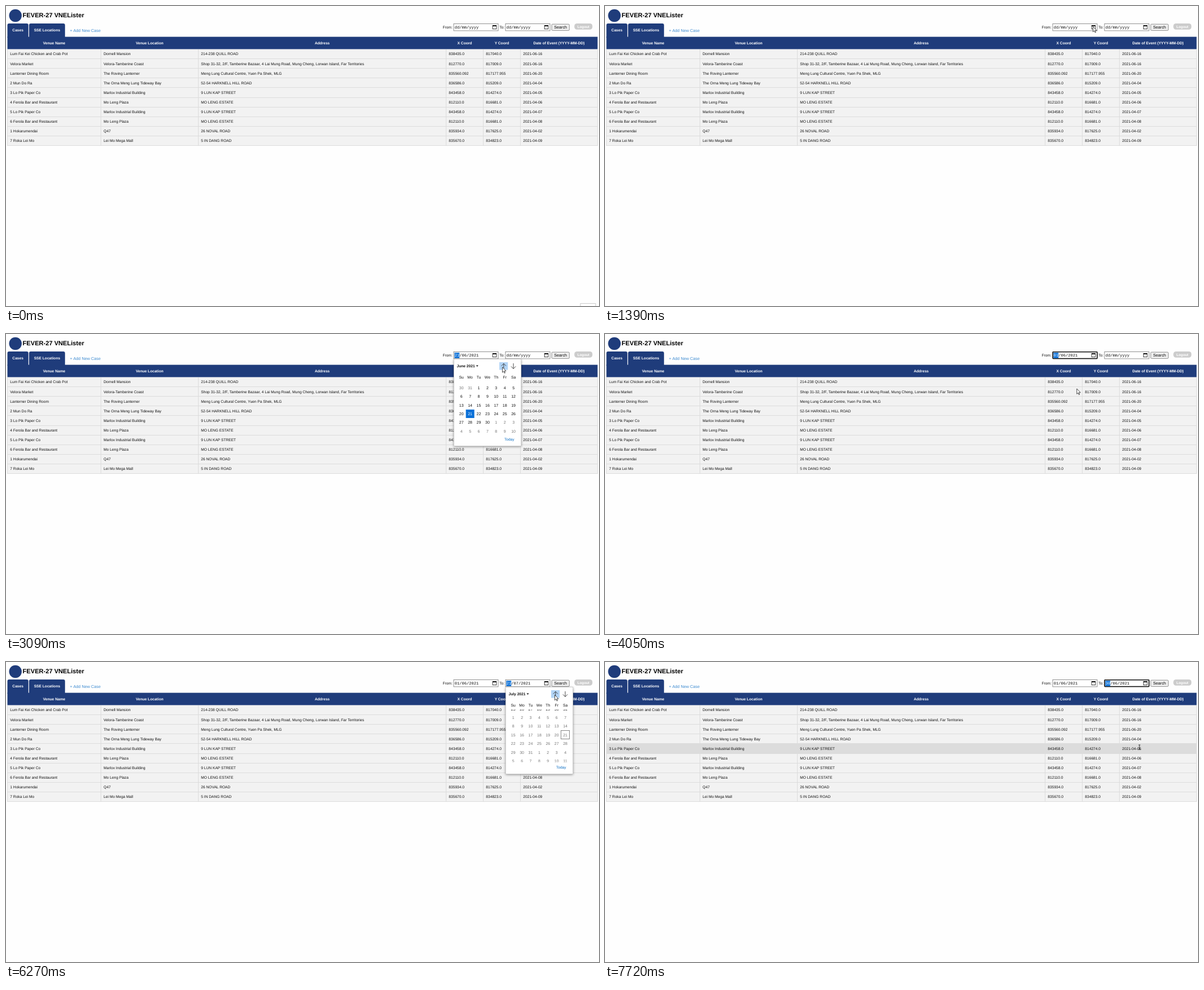
An HTML page for the animation above (7990 ms loop, 1053 by 532 pixels).

```html
<!DOCTYPE html>
<html lang="en">
<head>
<meta charset="utf-8">
<title>Event locations</title>
<style>
  html, body { margin: 0; width: 100%; height: 100%; overflow: hidden; background: #fefefe; }
  svg { display: block; width: 100vw; height: 100vh; }
  text {
    font-family: "Liberation Sans", Arial, sans-serif;
    text-rendering: geometricPrecision;
    white-space: pre;
  }
  .mono { font-family: "Liberation Mono", "Courier New", monospace; }
  .crisp { shape-rendering: crispEdges; }
</style>
</head>
<body>
<svg id="stage" viewBox="0 0 1053 532" preserveAspectRatio="none"></svg>
<script>
const LOOP = 7990;
const NAVY = '#1f3c7b', BLUE = '#0a70d8', HOVER = '#b3d5f7';
const stage = document.getElementById('stage');

function add(parent, tag, attrs = {}) {
  const el = document.createElementNS('http://www.w3.org/2000/svg', tag);
  for (const k in attrs) el.setAttribute(k, attrs[k]);
  parent.append(el);
  return el;
}
const rect = (p, x, y, width, height, attrs) => add(p, 'rect', { x, y, width, height, ...attrs });
const path = (p, d, attrs) => add(p, 'path', { d, fill: 'none', ...attrs });
function text(p, str, x, y, size = 6.65, attrs = {}) {
  const el = add(p, 'text', { x, y, 'font-size': size, fill: '#111', ...attrs });
  el.textContent = str;
  return el;
}
const MID = { 'text-anchor': 'middle' };
const BOLD = { 'font-weight': 700 };
const CRISP = { class: 'crisp' };
const show = (el, on) => el.setAttribute('visibility', on ? 'visible' : 'hidden');
const within = (t, [a, b]) => t >= a && t < b;

// Page header
add(stage, 'circle', { cx: 16.7, cy: 17, r: 11.2, fill: NAVY });
text(stage, 'FEVER-27 VNELister', 29.6, 20.3, 11.1, { ...BOLD, fill: '#000' });
function tab(label, x, w) {
  path(stage, `M${x} 56V34q0-3 3-3h${w - 6}q3 0 3 3v22z`, { fill: NAVY });
  text(stage, label, x + w / 2, 44.9, 6.65, { ...MID, ...BOLD, fill: '#fff' });
}
tab('Cases', 2.5, 37.3);
tab('SSE Locations', 41, 63.8);
text(stage, '+ Add New Case', 113.5, 45.7, 7.3, { fill: '#3c8ad0' });
text(stage, 'From:', 775.4, 40.1);
text(stage, 'To:', 876.3, 40.1);
rect(stage, 969, 32.2, 31.3, 11.2, { rx: 1.5, fill: '#efefef', stroke: '#767676', 'stroke-width': .8 });
text(stage, 'Search', 984.7, 40.2, 7.2, { ...MID, fill: '#000' });
rect(stage, 1009.3, 31, 32, 10.8, { rx: 4.5, fill: '#ccc' });
text(stage, 'Logout', 1025.3, 38.5, 6.3, { ...MID, ...BOLD, fill: '#fff' });

// Table
const EDGES = [2.5, 168.5, 341.5, 781.5, 847.5, 913.5, 1050.5];
const TOP = 76.5, ROW = 17.1;
const HEADS = ['Venue Name', 'Venue Location', 'Address', 'X Coord', 'Y Coord', 'Date of Event (YYYY-MM-DD)'];
const ROWS = `Lum Fai Kei Chicken and Crab Pot|Dornell Mansion|214-238 QUILL ROAD|838435.0|817040.0|2021-06-16
Velora Market|Velora-Tamberine Coast|Shop 31-32, 2/F, Tamberine Bazaar, 4 Lai Mung Road, Mung Cheng, Lorwan Island, Far Territories|812770.0|817009.0|2021-06-16
Lanterner Dining Room|The Roving Lanterner|Meng Lung Cultural Centre, Yuen Pa Shek, MLG|835560.092|817177.955|2021-06-20
2 Mun Do Ra|The Orna Meng Lung Tideway Bay|52-54 HARKNELL HILL ROAD|836586.0|815209.0|2021-04-04
3 Lo Pik Paper Co|Marlox Industrial Building|9 LUN KAP STREET|843458.0|814274.0|2021-04-05
4 Ferola Bar and Restaurant|Mo Leng Plaza|MO LENG ESTATE|812110.0|816681.0|2021-04-06
5 Lo Pik Paper Co|Marlox Industrial Building|9 LUN KAP STREET|843458.0|814274.0|2021-04-07
6 Ferola Bar and Restaurant|Mo Leng Plaza|MO LENG ESTATE|812110.0|816681.0|2021-04-08
1 Hokarumendai|Q47|26 NOVAL ROAD|835934.0|817625.0|2021-04-02
7 Roka Lei Mo|Lei Mo Mega Mall|5 IN DANG ROAD|835670.0|834823.0|2021-04-09`
  .split('\n').map(line => line.split('|'));

const tableWidth = EDGES[6] - EDGES[0];
const bands = ROWS.map((cells, i) => rect(stage, EDGES[0], TOP + i * ROW, tableWidth, ROW, CRISP));
const bottom = TOP + ROWS.length * ROW;
const grid = { ...CRISP, stroke: '#dcdcdc', 'stroke-width': 1 };
ROWS.forEach((cells, i) => {
  path(stage, `M${EDGES[0]} ${Math.floor(TOP + (i + 1) * ROW) + .5}H${EDGES[6]}`, grid);
  cells.forEach((s, c) => text(stage, s, EDGES[c] + 4.8, TOP + i * ROW + 10.9));
});
EDGES.forEach(x => path(stage, `M${x} ${TOP}V${bottom}`, grid));
rect(stage, EDGES[0], 54.6, tableWidth, TOP - 54.6, { fill: NAVY });
HEADS.forEach((s, c) => text(stage, s, (EDGES[c] + EDGES[c + 1]) / 2, 67.8, 6.65, { ...MID, ...BOLD, fill: '#fff' }));

const corner = rect(stage, 1020, 527.6, 27, 8, { fill: '#fff', stroke: '#c4c4c4', 'stroke-width': .9 });

// Date fields: values by time, focus span, ring span, popup span
const GAP = 92;
const SCROLL = 284;
const BLANK = 'dd/mm/yyyy';
const FIELDS = [
  { dx: 0, focus: [1460, 5450], ring: [3780, 5450], open: [1460, 3780], clicks: [2380, 2665],
    values: [[0, BLANK], [2380, '21/07/2021'], [2665, '21/06/2021'], [3780, '01/06/2021']] },
  { dx: GAP, focus: [5520, LOOP], ring: [7110, LOOP], open: [5520, 7110], clicks: [6230, 6515],
    values: [[0, BLANK], [6230, '21/07/2021'], [6515, '21/06/2021'], [7110, '30/06/2021']] },
];
const valueAt = (f, t) => f.values.filter(v => v[0] <= t).pop()[1];

for (const f of FIELDS) {
  const g = add(stage, 'g', { transform: `translate(${f.dx} 0)` });
  rect(g, 795, 31.5, 79, 12.4, { fill: '#fff', stroke: '#767676', 'stroke-width': .8 });
  f.ringEl = rect(g, 795.2, 31.8, 78.8, 11.8, { rx: 1, fill: 'none', stroke: '#101010', 'stroke-width': 1.5 });
  f.mark = rect(g, 796.4, 33.2, 8.8, 9.6, { fill: BLUE });
  f.day = text(g, '', 796.7, 40.3, 7.1, { class: 'mono' });
  f.rest = text(g, '', 805.2, 40.3, 7.1, { class: 'mono' });
  rect(g, 864.2, 34.4, 6.6, 6.4, { fill: 'none', stroke: '#111', 'stroke-width': .8 });
  rect(g, 864, 34, 7, 2, { fill: '#111' });
}

// Calendar popup
const CELL = 15.4, COL0 = 808.7, WEEK0 = 95.3;
const MONTHS = { 6: 'June 2021', 7: 'July 2021', 8: 'August 2021' };
const defs = add(stage, 'defs');
rect(add(defs, 'clipPath', { id: 'weeks' }), 796, 84.3, 118, 93.2);
const popup = add(stage, 'g');
rect(popup, 795.3, 44.6, 119.4, 154, { fill: '#fff', style: 'filter: drop-shadow(0 1.5px 2px #0007)' });
rect(popup, 795.3, 44.6, 119.4, 154, { fill: '#fff', stroke: '#c2c2c2', 'stroke-width': .7 });
const title = text(popup, '', 800.5, 59.1, 6.65, BOLD);
const caret = path(popup, 'M0 55.6h4l-2 2.4z', { fill: '#111' });
const upHover = rect(popup, 876, 50, 15.2, 13.6, { fill: HOVER });
const line = { stroke: '#333', 'stroke-width': .9 };
path(popup, 'M883.8 62V52.4M879.7 56.6l4.1-4.2l4.1 4.2', line);
path(popup, 'M901 52V61.6M896.9 57.4l4.1 4.2l4.1-4.2', line);
['Su', 'Mo', 'Tu', 'We', 'Th', 'Fr', 'Sa'].forEach((s, d) => text(popup, s, COL0 + d * CELL, 79.4, 6.8, MID));
text(popup, 'Today', 893.8, 189.4, 6.5, { ...MID, fill: '#0067c0' });

const weeks = add(add(popup, 'g', { 'clip-path': 'url(#weeks)' }), 'g');
const square = attrs => rect(weeks, -7.5, -7.5, 15, 15, attrs);
const dayHover = square({ fill: HOVER });
const picked = square({ fill: BLUE });
const today = square({ ...CRISP, fill: 'none', stroke: '#858585', 'stroke-width': 1 });
const moveTo = (el, week, d) => el.setAttribute('transform', `translate(${COL0 + d * CELL} ${WEEK0 + week * CELL})`);
moveTo(today, 2, 6);
const days = [];
for (let week = -10; week < 7; week++) {
  for (let d = 0; d < 7; d++) {
    const date = new Date(Date.UTC(2021, 7, 1 + week * 7 + d));
    const el = text(weeks, date.getUTCDate(), COL0 + d * CELL, WEEK0 + week * CELL + 2.5, 7, MID);
    days.push({ el, week, d, month: date.getUTCMonth() + 1, day: date.getUTCDate() });
  }
}

// Pointer
const glow = add(stage, 'circle', { cy: 1.8, r: 6.8, fill: '#e8e200', 'fill-opacity': .65 });
const arrow = path(stage, 'M0 0V9.4L2.2 7.4L3.7 10.7L5 10.1L3.6 6.9H6.5Z',
  { fill: '#fff', stroke: '#111', 'stroke-width': .75 });
const beam = path(stage, 'M-1.6-4H1.6M0-4V4M-1.6 4H1.6', { stroke: '#111', 'stroke-width': .8 });
const TRAIL = [
  [400, 975, 508], [1180, 870, 47], [1320, 866.6, 36.5], [1920, 866.6, 36.5],
  [2250, 885.4, 55.2], [3000, 885.4, 55.2], [3510, 838.6, 97], [4050, 837.8, 97],
  [4430, 850, 116], [4610, 876, 76], [5310, 958.6, 37], [5600, 958.6, 37],
  [6060, 974.5, 58.4], [6580, 974.5, 58.4], [6970, 947.5, 157], [7200, 947.5, 157],
  [7650, 949, 151],
];
const GLOWS = [1430, 2440, 2690, 3730, 5440, 6300, 6550, 7060];

const smooth = p => p * p * (3 - 2 * p);
const inOut = p => p < .5 ? 2 * p * p : 1 - 2 * (1 - p) ** 2;
const clamp = p => Math.min(1, Math.max(0, p));

function pointerAt(t) {
  const i = TRAIL.findIndex(k => k[0] > t);
  if (i < 0) return TRAIL[TRAIL.length - 1].slice(1);
  if (i === 0) return TRAIL[0].slice(1);
  const [t0, x0, y0] = TRAIL[i - 1], [t1, x1, y1] = TRAIL[i];
  const p = smooth((t - t0) / (t1 - t0));
  return [x0 + (x1 - x0) * p, y0 + (y1 - y0) * p];
}

function drawField(f, t) {
  const value = valueAt(f, t), focused = within(t, f.focus);
  f.day.textContent = value.slice(0, 2);
  f.rest.textContent = value.slice(2);
  f.day.setAttribute('fill', focused ? '#fff' : '#111');
  show(f.mark, focused);
  show(f.ringEl, within(t, f.ring));
}

function drawPopup(f, t, x, y) {
  const value = valueAt(f, t);
  const chosen = value !== BLANK;
  const day = chosen ? +value.slice(0, 2) : 0;
  const month = chosen ? +value.slice(3, 5) : 8;
  const part = f.clicks.map(c => inOut(clamp((t - c) / SCROLL)));
  const offset = 5 * part[0] + 4 * part[1];
  const px = x - f.dx;

  popup.setAttribute('transform', `translate(${f.dx} 0)`);
  weeks.setAttribute('transform', `translate(0 ${offset * CELL})`);
  title.textContent = MONTHS[month];
  caret.setAttribute('transform', `translate(${802.6 + title.getComputedTextLength()} 0)`);
  show(upHover, px > 876 && px < 891.2 && y > 50 && y < 63.6);

  const col = Math.round((px - COL0) / CELL), row = Math.round((y - WEEK0) / CELL);
  show(dayHover, y > 87.6 && row < 6);
  moveTo(dayHover, row - Math.round(offset), col);
  show(picked, chosen);
  for (const c of days) {
    const isPicked = c.day === day && c.month === month;
    if (isPicked) moveTo(picked, c.week, c.d);
    c.el.setAttribute('fill', isPicked ? '#fff' : c.month === month ? '#111' : '#767676');
  }
}

function render(t) {
  const [x, y] = pointerAt(t);
  show(corner, t < 70);
  FIELDS.forEach(f => drawField(f, t));

  const active = FIELDS.find(f => within(t, f.open));
  popup.setAttribute('display', active ? 'inline' : 'none');
  if (active) drawPopup(active, t, x, y);

  const idle = t < 400 || active || within(t, [3780, 4120]) || within(t, [7110, 7250]);
  const over = idle ? -1 : Math.floor((y - TOP + 1) / ROW);
  bands.forEach((b, i) => b.setAttribute('fill', i === over ? '#dcdcdc' : '#f2f2f2'));

  const place = `translate(${x} ${y})`;
  [glow, arrow, beam].forEach(el => el.setAttribute('transform', place));
  show(glow, GLOWS.some(g => within(t, [g, g + 140])));
  show(arrow, t >= 400 && t < 7250);
  show(beam, t >= 7250);
}

const start = performance.now();
function tick() {
  render((performance.now() - start) % LOOP);
  requestAnimationFrame(tick);
}
tick();
</script>
</body>
</html>
```
